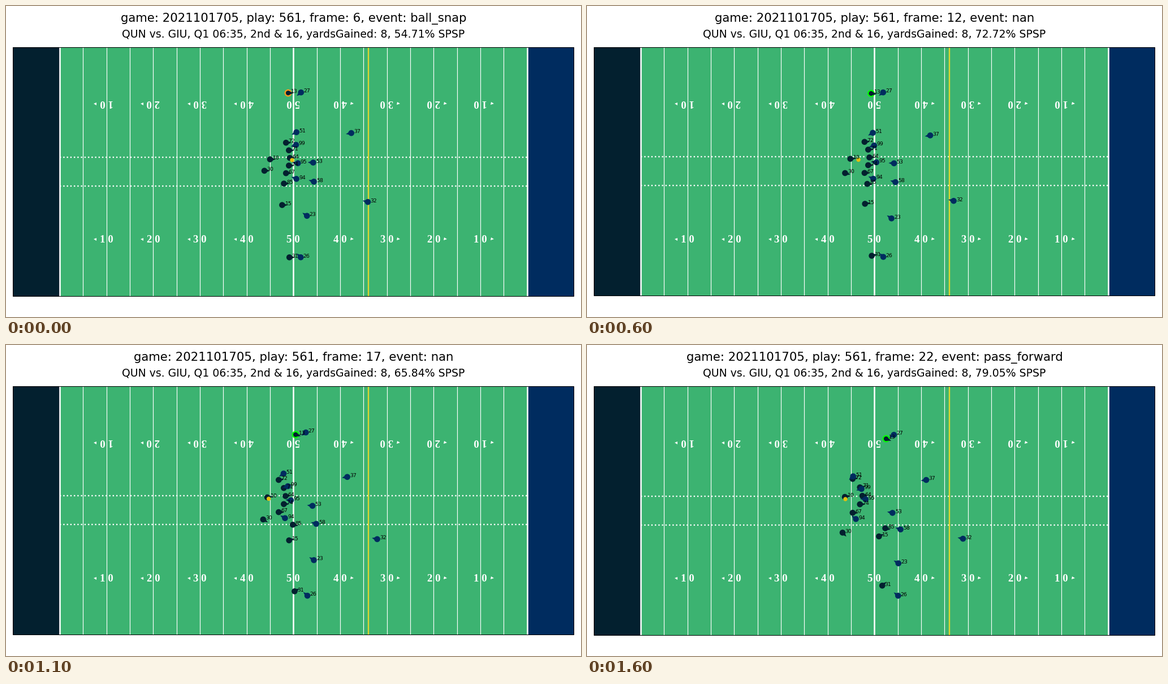
Animation of 1017x551 px, one loop 1.7 s. Source, as a matplotlib script:

```python
import numpy as np
import matplotlib.pyplot as plt
from matplotlib.animation import FuncAnimation
from matplotlib.patches import Circle, Polygon, Rectangle

W, H, DPI = 1017, 551, 64
PX = 72 / DPI     # one pixel in points
UNIT = 1.178      # pixels per design point
FRAMES, STEP = 17, 100

GRASS = "#3cb371"
HOME, AWAY = "#03202f", "#002c5f"
LEFT, RIGHT, TOP, BOTTOM = 12.35, 1004.35, 72.8, 512.8
YARD = (RIGHT - LEFT) / 120
HASHES = (267.3, 318.3)

# Jersey, start x and y, total run in x and y
BACKS = [(13, 499, 153.5, 30, 12), (10, 467, 271, -11, -2.5),
         (30, 457, 291.3, -5, 40.5), (85, 491.5, 314, 36, 10),
         (15, 488.4, 352, 28, -13.5), (31, 501.2, 444.7, 21, -19)]
# The line forms an arc around the centre and folds back into a pocket
LINE = [(n, 502 - 1.7 * k * k, 268.6 + 13.5 * k, -15 - 2.6 * k * k, 1.5 * k - 2)
        for n, k in zip((72, 71, 64, 74, 67), range(-2, 3))]
RUSH = [(51, 513.7, 223, -43, 9), (99, 513, 245.4, -27.5, 9),
        (95, 516.3, 277.9, -23.5, -5.3), (94, 513.6, 305.7, -38, 2)]
COVER = [(27, 521.8, 152.5, 21, 6), (53, 543.3, 276.8, -3, 20),
         (58, 544.6, 310.6, 10, 15.5), (26, 521.3, 444.6, 29, -1)]
DEEP = [(37, 610.7, 224.5, -10.7, 14), (32, 640, 346.6, 25, -4),
        (23, 532.3, 371.2, 18.5, 15)]

CHANCE_AT = (0, 1, 4, 8, 11, 13, 16)
CHANCE = (54.71, 63.29, 66.28, 79.17, 65.84, 79.38, 79.05)
EVENTS = {0: "ball_snap", 16: "pass_forward"}

fig = plt.figure(figsize=(W / DPI, H / DPI), dpi=DPI, facecolor="white")
ax = fig.add_axes([0, 0, 1, 1])
ax.set_xlim(0, W)
ax.set_ylim(H, 0)
ax.axis("off")


def yard_x(yard):
    return LEFT + YARD * (10 + yard)


def box(x0, x1, color, z, **kw):
    r = Rectangle((x0, TOP), x1 - x0, BOTTOM - TOP, facecolor=color, zorder=z, **kw)
    return ax.add_patch(r)


def upright(x, color, width, z):
    return ax.plot([x, x], [TOP, BOTTOM], color=color, lw=width * PX, zorder=z,
                   solid_capstyle="butt")[0]


def label(x, y, s, points, **kw):
    return ax.text(x, y, s, fontsize=points * UNIT * PX, va="baseline", **kw)


# Field
boxes = [box(LEFT, RIGHT, GRASS, 0, lw=0),
         box(LEFT, yard_x(0), HOME, 1, lw=0),
         box(yard_x(100), RIGHT, AWAY, 1, lw=0),
         box(LEFT, RIGHT, "none", 4, edgecolor="black", lw=PX)]
lines = [upright(yard_x(y), "white", 2.6 if y % 50 == 0 else UNIT, 2)
         for y in range(0, 101, 5)]
lines.append(upright(yard_x(66), "#dfd52f", 2 * UNIT, 3))
hashes = [ax.plot([yard_x(0), yard_x(100)], [y, y], ":", color="white",
                  lw=2 * UNIT * PX, zorder=2)[0] for y in HASHES]

for y in range(10, 100, 10):
    x = yard_x(y)
    text = " ".join(str(min(y, 100 - y)))
    for base, turn in ((419.2, 0), (167.2, 180)):
        label(x, base, text, 16, color="white", ha="center", rotation=turn,
              rotation_mode="anchor", family="Liberation Serif", weight="bold", zorder=3)
    if y != 50:
        side = -1 if y < 50 else 1
        ax.plot([x + side * 20.5] * 2, [173, 412.5], "<" if side < 0 else ">",
                color="white", ms=5 * PX, mew=0, zorder=3)

title = label(508.5, 28, "", 18, ha="center")
subtitle = label(508.5, 56, "", 16, ha="center")


class Player:
    def __init__(self, row, color, pace, z):
        number, *path = row
        self.start, self.run = np.reshape(path, (2, 2))
        self.pace = pace
        self.wedge = ax.add_patch(Polygon(np.zeros((3, 2)), color=color, lw=0, zorder=z))
        self.dot = ax.add_patch(Circle((0, 0), 5.3, fc=color, lw=0, zorder=z))
        self.tag = label(0, 0, str(number), 8, zorder=9)

    def at(self, u):
        return self.start + self.run * u ** self.pace

    def place(self, u, dy, angle):
        c = self.at(u) + (0, dy)
        ahead = np.array([np.cos(angle), np.sin(angle)])
        side = np.array([-ahead[1], ahead[0]])
        self.wedge.set_xy([c + 9.7 * ahead, c + 4 * side, c - 4 * side])
        self.dot.center = c
        self.tag.set_position(c + (4.5, 0.3))


def squad(rows, color, pace, z):
    return [Player(r, color, pace, z) for r in rows]


offense = squad(BACKS, HOME, 2.2, 5) + squad(LINE, HOME, 1.8, 5)
defense = (squad(RUSH, AWAY, 1.7, 7) + squad(COVER, AWAY, 2.4, 7)
           + squad(DEEP, AWAY, 1.1, 7))
receiver, passer = offense[:2]
receiver.dot.set_linewidth(2.3 * PX)
receiver.wedge.set_zorder(5.5)
ball = ax.add_patch(Circle((0, 0), 3.7, fc="#e3c010", lw=0, zorder=6))


def upfield_angle(p, u):
    """Runners start square and turn into their run."""
    dx, dy = p.run
    return u * np.clip(np.arctan2(dy, abs(dx)), -0.8, 0.8)


def watch_angle(p, u):
    """Defenders look back, partly turned to the passer."""
    dx, dy = p.at(u) - passer.at(u)
    return np.pi + 0.6 * np.arctan2(dy, dx)


def draw(i):
    u = i / (FRAMES - 1)
    event = EVENTS.get(i, "nan")
    tall = "_" in event  # a taller title nudges the field down
    dy = 0.6 * tall
    chance = np.interp(i, CHANCE_AT, CHANCE)
    title.set_text(f"game: 2021101705, play: 561, frame: {i + 6}, event: {event}")
    subtitle.set_text("QUN vs. GIU, Q1 06:35, 2nd & 16, yardsGained: 8, "
                      f"{chance:.2f}% SPSP")
    for b in boxes:
        b.set_height(BOTTOM + tall - TOP)
    for ln in lines:
        ln.set_ydata([TOP, BOTTOM + tall])
    for ln, y in zip(hashes, HASHES):
        ln.set_ydata([y + dy, y + dy])
    for p in offense:
        p.place(u, dy, upfield_angle(p, u))
    for p in defense:
        p.place(u, dy, watch_angle(p, u))
    receiver.dot.set_edgecolor("#ff9a1f" if chance < 60 else "#00ff00")
    ball.center = (506 - 49 * (1 - (1 - u) ** 1.6), 272.4 + dy)
    return []


anim = FuncAnimation(fig, draw, frames=FRAMES, interval=STEP, repeat=True,
                     repeat_delay=0, blit=False)
plt.show()
```
